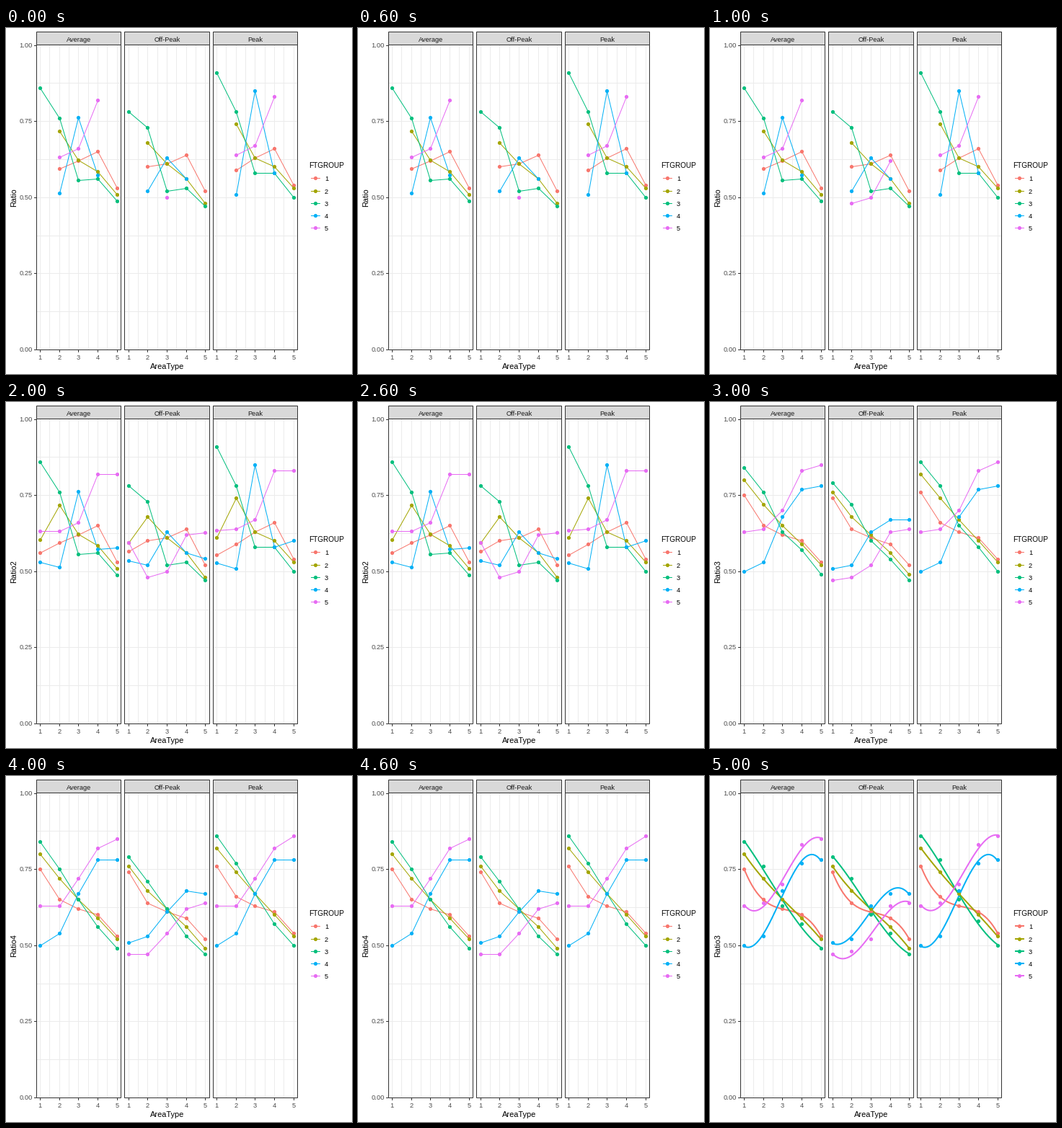
Recreate the animation shown at these times as a matplotlib script. Size 480 px wide and 480 px high, loop 6000 ms.

```python
import numpy as np
import matplotlib.pyplot as plt
from matplotlib.animation import FuncAnimation
from matplotlib.patches import Circle, Rectangle

plt.rcParams["font.family"] = "Liberation Sans"
plt.rcParams["path.snap"] = False

SIZE = 480
TOP, BOTTOM = 23, 446
WIDTH = 117.2
COLORS = ["#F8766D", "#A3A500", "#00BF7D", "#00B0F6", "#E76BF3"]
PANELS = ["Average", "Off-Peak", "Peak"]
LABELS = ["Ratio", "Ratio", "Ratio2", "Ratio3", "Ratio4", "Ratio3"]
AREAS = np.arange(1, 6)
DARK, GRID, TICK_TEXT = "#333333", "#EBEBEB", "#4D4D4D"


def cubic(x, knots, values):
    return np.polyval(np.polyfit(knots, values, 3), x)


def panels(peak, off, share):
    """Stack the three panels; the average leans to the peak by share."""
    share = np.array(share)[:, None]
    return np.stack([share * peak + (1 - share) * off, off, peak]) / 100


# Survey key points, one row per group, in percent.
peak = np.array([[55.5, 59, 63, 66, 54], [61, 74, 63, 60, 53],
                 [91, 78, 58, 58, 50], [52.7, 51, 85, 58, 60],
                 [63.4, 64, 67, 83, 83]])
off = np.array([[56.5, 60, 61, 64, 52], [59.5, 68, 61, 56, 48],
                [78, 73, 52, 53, 47], [53.6, 52, 63, 56, 54.3],
                [59.5, 48, 50, 62, 62.7]])
filled = panels(peak, off, [0.5, 0.6, 0.6, 0.6, 0.95])

# Most groups were not measured in the outer areas.
measured = filled.copy()
measured[:, [0, 1, 3, 4], 0] = np.nan
measured[:, 3:, 4] = np.nan
sparse = measured.copy()
sparse[1, 4, [1, 3]] = np.nan

# Ordered trend: a cubic through four anchors, bent by a small kink.
# The off-peak drop eases from its first to its last value.
anchors = [(76, 66, 61, 54), (82, 74, 60, 53), (86.3, 77, 57, 50.3),
           (49.8, 53.9, 77.9, 77.8), (63.6, 63.3, 82.3, 86.2)]
drops = np.array([(2, 2), (6, 3.5), (7, 3), (-1, 11.5), (16, 21.5)])
kinks = np.array([0, 0, -0.25, 0.25, -0.3])

t = (AREAS - 1) / 4
ease = t * t * (3 - 2 * t)
bend = kinks[:, None] * np.array([1, -4, 6, -4, 1])
trend = np.array([cubic(AREAS, (1, 2, 4, 5), a) for a in anchors]) + bend
drop = drops[:, :1] + (drops[:, 1:] - drops[:, :1]) * ease
ordered = panels(trend, trend - drop, [0.5, 0.65, 0.65, 0.97, 0.97]).round(2)
fitted = np.array([[cubic(AREAS, AREAS, v) for v in panel]
                   for panel in ordered]).round(2)

STAGES = [sparse, measured, filled, ordered, fitted, ordered]
SMOOTH = 5


def left(panel):
    return 41.8 + 122.5 * panel


def px(panel, area):
    return left(panel) + WIDTH * (np.asarray(area) - 0.8) / 4.4


def py(value):
    return BOTTOM - np.asarray(value) * (BOTTOM - TOP - 0.5)


def mid(v):
    """Centre of the pixel nearest to v."""
    return np.round(v) + 0.5


fig = plt.figure(figsize=(SIZE / 72, SIZE / 72), dpi=72, facecolor="white")
ax = fig.add_axes([0, 0, 1, 1])
ax.set_xlim(0, SIZE)
ax.set_ylim(SIZE, 0)
ax.axis("off")


def stroke(x, y, color, z, lw=1):
    return ax.plot(x, y, color=color, lw=lw, zorder=z,
                   solid_capstyle="butt", solid_joinstyle="round")[0]


def dot(x, y, color):
    return ax.add_patch(Circle((x, y), 2.6, fc=color, lw=0, zorder=3))


def box(x0, y0, x1, y1, fill, z):
    ax.add_patch(Rectangle((x0, y0), x1 - x0, y1 - y0, fc=fill, ec=DARK,
                           lw=1, zorder=z))


def write(x, y, text, size=9.2, color="black", ha="center", **kw):
    return ax.text(x, y, text, fontsize=size, color=color, ha=ha,
                   va="baseline", zorder=6, **kw)


# Panels
for p, name in enumerate(PANELS):
    x0, x1 = mid(left(p)), mid(left(p) + WIDTH)
    for v in np.arange(0.125, 1, 0.125):
        stroke([x0, x1], [mid(py(v))] * 2, GRID, 1)
    for a in np.arange(1, 5.1, 0.5):
        stroke([mid(px(p, a))] * 2, [TOP, BOTTOM], GRID, 1)
    for a in AREAS:
        x = mid(px(p, a))
        stroke([x, x], [BOTTOM, BOTTOM + 4], DARK, 4)
        write(x - 0.5, 460, str(a), color=TICK_TEXT)
    box(x0, TOP + 0.5, x1, BOTTOM + 0.5, "none", 4)
    box(x0, 5.5, x1, TOP + 0.5, "#D9D9D9", 5)
    write((x0 + x1) / 2, 19, name, color="#1A1A1A")

# Axes
for v in np.arange(0, 1.1, 0.25):
    y = mid(py(v))
    stroke([39, 42], [y, y], DARK, 4)
    write(36.6, y + 2.5, f"{v:.2f}", color=TICK_TEXT, ha="right")
write(223.2, 473, "AreaType", 11)
y_title = write(14, 234.8, "", 11, rotation=90, rotation_mode="anchor")

# Legend
write(420, 194, "FTGROUP", 10, ha="left")
key_rows = np.round(277.4 - 17.28 * np.arange(4, -1, -1))
keys = []
for g, (row, color) in enumerate(zip(key_rows, COLORS)):
    keys.append(stroke([423, 436], [row + 0.5] * 2, color, 2))
    dot(429.5, row + 0.5, color)
    write(442, row + 4, str(g + 1), ha="left")

# Series
pairs = [(p, g) for p in range(3) for g in range(5)]
lines = {k: stroke([], [], COLORS[k[1]], 2) for k in pairs}
dots = {k: [dot(0, 0, COLORS[k[1]]) for _ in AREAS] for k in pairs}
fine = np.linspace(1, 5, 80)


def update(i):
    smooth = i == SMOOTH
    lw = 2 if smooth else 1
    y_title.set_text(LABELS[i])
    for key, row in zip(keys, key_rows):
        key.set_linewidth(lw)
        key.set_ydata([row if smooth else row + 0.5] * 2)
    for p, g in pairs:
        values = STAGES[i][p, g]
        xs, ys = mid(px(p, AREAS)), mid(py(values))
        line = lines[p, g]
        line.set_linewidth(lw)
        if smooth:
            line.set_data(px(p, fine) + 0.5, py(cubic(fine, AREAS, values)) + 0.5)
        else:
            line.set_data(xs, ys)
        for d, x, y in zip(dots[p, g], xs, ys):
            shown = bool(np.isfinite(y))
            d.set_visible(shown)
            if shown:
                d.center = (x, y)
    return []


anim = FuncAnimation(fig, update, frames=6, interval=1000, repeat=True,
                     repeat_delay=0, init_func=lambda: update(0), blit=False)
plt.show()
```
